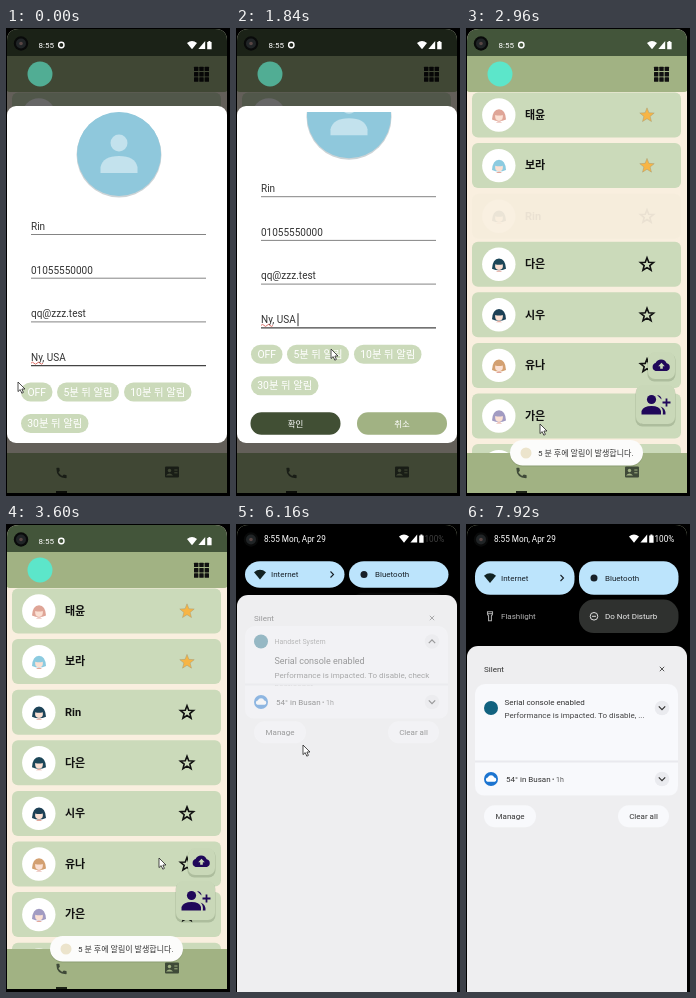
An HTML page that plays this animation: 224 px wide and 468 px high, repeating every 8000 ms.

```html
<!DOCTYPE html>
<html lang="ko">
<head>
<meta charset="utf-8">
<style>
html, body { margin: 0; width: 100%; height: 100%; overflow: hidden; background: #000; }
svg { display: block; width: 224px; height: 468px; }
text { font-family: Roboto, "Noto Sans CJK KR", "Noto Sans CJK", sans-serif; white-space: pre; }
</style>
</head>
<body>
<svg id="stage" viewBox="0 0 224 468"></svg>
<script>
const LOOP = 8000;
const INK = '#20085a', CARD = '#cbdaba', OLIVE = '#a1b283';

// Markup helpers
const rect = (x, y, w, h, fill, r = 0, extra = '') =>
  `<rect x="${x}" y="${y}" width="${w}" height="${h}" rx="${r}" fill="${fill}" ${extra}/>`;
const circle = (x, y, r, fill, extra = '') => `<circle cx="${x}" cy="${y}" r="${r}" fill="${fill}" ${extra}/>`;
const path = (d, fill, extra = '') => `<path d="${d}" fill="${fill}" ${extra}/>`;
const line = (d, color, width = 1) => path(d, 'none', `stroke="${color}" stroke-width="${width}"`);
const text = (x, y, size, fill, str, extra = '') =>
  `<text x="${x}" y="${y}" font-size="${size}" fill="${fill}" ${extra}>${str}</text>`;
const group = (id, body, extra = '') => `<g id="${id}" ${extra}>${body}</g>`;
const at = (x, y, body) => `<g transform="translate(${x} ${y})">${body}</g>`;
const scaled = (k, body) => `<g transform="scale(${k})">${body}</g>`;
const MID = 'text-anchor="middle"';

function star(x, y, filled) {
  const outer = filled ? 7.6 : 6.9;
  const pts = Array.from({ length: 10 }, (_, i) => {
    const r = i % 2 ? outer * .43 : outer, a = i * Math.PI / 5 - Math.PI / 2;
    return `${(x + r * Math.cos(a)).toFixed(2)} ${(y + .4 + r * Math.sin(a)).toFixed(2)}`;
  });
  const style = filled ? 'stroke="#a89a72" stroke-width=".5"' : 'stroke="#111" stroke-width="1.6"';
  return path(`M${pts.join('L')}Z`, filled ? '#f7b545' : 'none', style);
}

const face = hair =>
  path('M-7 4Q-6.5-6 0-6.3Q6.5-6 7 4Q0 7-7 4Z', hair) +
  path('M-3.8-.4Q0 .6 3.8-.4Q4.6 5 0 5.4Q-4.6 5-3.8-.4Z', '#fbe0d3') +
  path('M-3 7Q0 4.4 3 7Z', '#e3a79b');

const row = (name, hair, fav) =>
  rect(6, 0, 209, 45, CARD, 6) + circle(32.8, 22.5, 16.7, '#fff') + at(33, 23, face(hair)) +
  text(59, 26.3, 11, '#111', name, 'font-weight="700"') + star(181, 22.5, fav);

const rowTop = i => 64.5 + 50.6 * i;

const statusIcons = (x, y) => at(x, y,
  path('M-5-2Q0-6 5-2L0 4.2Z', '#fff') + path('M6.4 4H13.2V-4Z', '#fff') +
  path('M15.2-3H16.4V-4H18.4V-3H19.6V4.2H15.2Z', '#fff'));

const phoneIcon = scaled(.57, at(-12, -12, path('M3 4Q3 3 4 3H7.5Q8.5 3 8.5 4Q8.5 6 9.2 8L6.6 10.8' +
  'Q9 15.2 13.2 17.4L16 14.8Q18 15.5 20 15.5Q21 15.5 21 16.5V20Q21 21 20 21Q3 20.5 3 4Z', '#3f4a38')));
const cardIcon = rect(-7, -5.5, 14, 11, '#3f4a38', 1) + circle(-2.5, -1.5, 1.7, OLIVE) +
  path('M-6 3.5Q-2.5-.3 1 3.5Z', OLIVE) + line('M2.3-2H5.5M2.3 .8H5.5', OLIVE);

const fab = (x, y, size, body) =>
  rect(x - .5, y + 1, size + 1, size + 1.5, '#364528', 7, 'opacity=".2"') +
  rect(x, y, size, size, '#c9d8b8', 7) + at(x + size / 2, y + size / 2, body);
const cloudUp = scaled(1.08, path('M-5.5 5A3.8 3.8 0 0 1-5.5-2.3A5.6 5.6 0 0 1 4.8-2A3.6 3.6 0 0 1 5 5Z', INK) +
  path('M0-2.5L3 .6H1.2V3H-1.2V.6H-3Z', '#c9d8b8'));
const addPeople = circle(-4, -5, 4.6, INK) + path('M-14 10V6.5Q-12 1.5-4 1.5Q4 1.5 5.5 6.5V10Z', INK) +
  path('M1.5-9.5Q6-9 6-5Q6-1-.0 1.5-.6Q4-5 1.5-9.5Z'.replace('-.0 ', ''), INK) +
  path('M5 2Q10.5 4 10 10H7.3Q8 4.5 5 2Z', INK) +
  line('M11-6V2M7-2H15', INK, 1.8);

// Contact list screen
const people = [
  ['태윤', '#dfa597', true], ['보라', '#8ccbe0', true], ['다은', '#1c4658'], ['시우', '#1d4055'],
  ['유나', '#d3a071'], ['가은', '#a29bc2'], ['도현', '#dc9a3c']
];
const gridIcon = Array.from({ length: 9 }, (_, i) =>
  rect(188 + i % 3 * 5.3, 38.7 + Math.floor(i / 3) * 5.3, 4.4, 4.4, '#111', .5)).join('');

const home =
  rect(0, 0, 222, 465, '#f9efdf') +
  people.slice(0, 2).map((p, i) => at(0, rowTop(i), row(...p))).join('') +
  group('newRow', at(0, rowTop(2), row('Rin', '#1d4358'))) +
  group('lowerRows', people.slice(2).map((p, i) => at(0, rowTop(i + 2), row(...p))).join('')) +
  fab(182, 324, 27, cloudUp) + fab(170, 357, 39, addPeople) +
  rect(0, 24, 222, 40, OLIVE, 4) + rect(0, 0, 222, 28, '#43553a') + gridIcon +
  rect(0, 425, 222, 42, OLIVE) + at(55.5, 445, phoneIcon) + at(166, 444, cardIcon) +
  rect(50, 463, 11, 2, '#1d2417') + rect(0, 465, 222, 3, '#000');

const homeStatus = group('homeStatus',
  text(32.5, 20, 8, '#fff', '8:55') + circle(55.3, 17, 2.7, 'none', 'stroke="#fff" stroke-width="1.4"') +
  statusIcons(186, 17));
const logo = circle(34, 46, 12.5, '#5ce6ca', 'id="logo"');
const camera = circle(15, 15.5, 7.2, '#090a0a') + circle(15, 15.5, 5, '#202426') + circle(15, 15.5, 1.8, '#574543');

// Edit dialog
const chip = (x, y, w, label, id = '') =>
  rect(x, y, w, 19, CARD, 9.5, id && `id="${id}"`) + text(x + w / 2, y + 13.2, 10.4, '#fff', label, MID);
const button = (x, fill, label) =>
  rect(x, 422, 90, 22.5, fill, 11) + text(x + 45, 436.4, 8.5, '#fff', label, MID);
const field = (value, i) => {
  const y = 43.7 * i;
  return text(25, 201.8 + y, 10, '#333', value) +
    line(`M25 ${206.5 + y}H200`, i === 3 ? '#444' : '#777', i === 3 ? 1.2 : .9);
};
const dialog = group('dialog',
  rect(1, 78, 220, 337, '#fff', 9) +
  `<g clip-path="url(#dialogClip)">` + group('form',
    circle(113, 127, 42.5, '#ccd3d6') + circle(113, 126, 42, '#8fc8dc') +
    circle(113, 115, 8.5, '#c3e2ed') + path('M94.5 145V139Q97 128 113 128Q129 128 131.5 139V145Z', '#c3e2ed') +
    ['Rin', '01055550000', 'qq@zzz.test', 'Ny, USA'].map(field).join('') +
    line('M25 335.2q1.5-2 3 0t3 0t3 0t3 0', '#d9534a', .8) +
    rect(61.5, 323, 1, 13, '#333', 0, 'id="caret"') +
    chip(15, 354.5, 31.5, 'OFF') + chip(51, 354.5, 62, '5분 뒤 알림', 'choice') +
    chip(118, 354.5, 67.5, '10분 뒤 알림') + chip(15, 386, 67.5, '30분 뒤 알림') +
    button(14.5, '#414f34', '확인') + button(121, OLIVE, '취소')) + '</g>');

const toast = group('toast',
  rect(44, 413.5, 133, 25, '#3a4630', 12.5, 'opacity=".2"') + rect(44, 412, 133, 25.5, '#fcfcfb', 12.7) +
  circle(60, 425, 5.5, '#ece4cc') +
  group('toastText', text(72, 428, 8, '#333', '5 분 후에 알림이 발생합니다.')));

// Notification shade
const tile = (x, fill, ink, label, icon) =>
  rect(x, -16.8, 99.5, 33.6, fill, 15, 'class="tileBox"') + at(x + 15, 0, icon) + text(x + 26, 2.9, 8, ink, label);
const wifi = path('M-6-2.3Q0-7 6-2.3L0 5Z', '#122');
const torch = path('M-2.5-4.5H2.5V-2L1.4-.5V4.5H-1.4V-.5L-2.5-2Z', 'none', 'stroke="#aaa" stroke-width="1.1"') +
  line('M-2.5-2.6H2.5', '#aaa');
const mute = circle(0, 0, 3.8, 'none', 'stroke="#ddd" stroke-width="1"') + line('M-2 0H2', '#ddd');
const chevron = (y, up) => circle(196, y, 7.3, '#eaebef') +
  line(up ? `M192.8 ${y + 1.6}l3.2-3.2l3.2 3.2` : `M192.8 ${y - 1.6}l3.2 3.2l3.2-3.2`, '#333', 1.2);
const pill = (x, w, label) => rect(x, -11, w, 22, '#f8f9fc', 11) + text(x + w / 2, 2.8, 8, '#333', label, MID);

const shade = group('shade',
  rect(0, 0, 224, 468, '#000', 0, 'id="scrim"') +
  group('shadeStatus', text(28, 17.5, 8.2, '#fff', '8:55 Mon, Apr 29') + statusIcons(168, 14.5) +
    group('percent', text(188.5, 17.5, 8.2, '#fff', '100%'))) +
  group('tiles',
    group('tilesTop', tile(9, '#bce4fc', '#182028', 'Internet', wifi) + line('M94.5-3l3 3l-3 3', '#182028', 1.1) +
      tile(113, '#bce4fc', '#182028', 'Bluetooth', circle(0, 0, 3.5, '#182028'))) +
    group('tilesLow', tile(9, '#000', '#b2b2b2', 'Flashlight', torch) +
      tile(113, '#2f312f', '#ededed', 'Do Not Disturb', mute))) +
  group('panel',
    rect(1, 0, 220, 480, '#eeeef0', 11) +
    group('notes',
      text(18, 25.5, 8, '#333', 'Silent') + line('M193.8 20.8l4.4 4.4m0-4.4l-4.4 4.4', '#444', .9) +
      `<g clip-path="url(#noteClip)">` + group('card',
        rect(9, 0, 203, 130, '#f8f9fc', 10) +
        group('opened', circle(25, 15.5, 7, '#2c778f') + text(38.5, 18, 7, '#777', 'Handset System') +
          chevron(15.5, true) + text(38.5, 37.5, 9, '#333', 'Serial console enabled') +
          text(38.5, 52, 8, '#555', 'Performance is impacted. To disable, check') +
          text(38.5, 63, 8, '#555', 'bootloader')) +
        group('closed', circle(25, 24, 7, '#11627f') + chevron(24, false) +
          text(38.5, 20.5, 8, '#333', 'Serial console enabled') +
          text(38.5, 33.5, 8, '#444', 'Performance is impacted. To disable, ...'))) + '</g>' +
      group('weather', path('M9-16.5H212V6.5Q212 16.5 202 16.5H19Q9 16.5 9 6.5Z', '#f8f9fc') +
        line('M9-17.5H212', '#e9e9ee', 2) + circle(25, 0, 7, '#1b74d0') +
        path('M21.5 2.8a2.2 2.2 0 0 1 .3-4.3a3.5 3.5 0 0 1 6.5 0a2.2 2.2 0 0 1 .4 4.3Z', '#fff') +
        text(40, 3, 8, '#333', '54° in Busan') + text(86, 3, 7, '#555', '• 1h') + chevron(0, false)) +
      group('actions', pill(18, 52, 'Manage') + pill(152, 51, 'Clear all')))));

const cursor = group('cursor',
  path('M0 0V9.6L2.2 7.6L3.8 11.2L5.4 10.4L3.9 7H7Z', '#fff', 'stroke="#222" stroke-width=".8"'));

const stage = document.getElementById('stage');
stage.innerHTML = `<defs>
  <clipPath id="screenClip"><path d="M1 480V13Q1 1 13 1H209Q221 1 221 13V480Z"/></clipPath>
  <clipPath id="dialogClip"><rect x="1" y="84" width="220" height="325"/></clipPath>
  <clipPath id="noteClip"><rect id="noteMask" x="9" width="203"/></clipPath></defs>` +
  rect(0, 0, 224, 468, '#000') + '<g clip-path="url(#screenClip)">' + home +
  rect(0, 0, 222, 465, '#000', 0, 'id="dim"') + logo + homeStatus + dialog + toast + shade + camera + '</g>' + cursor;

const el = {};
stage.querySelectorAll('[id]').forEach(node => { el[node.id] = node; });
const tileBoxes = stage.querySelectorAll('.tileBox');

// Keyframes as [time, value], eased between neighbours
function key(t, ...frames) {
  if (t <= frames[0][0]) return frames[0][1];
  for (let i = 1; i < frames.length; i++) {
    const [t0, a] = frames[i - 1], [t1, b] = frames[i];
    if (t < t1) {
      const u = (t - t0) / (t1 - t0);
      return a + (b - a) * u * u * (3 - 2 * u);
    }
  }
  return frames[frames.length - 1][1];
}
const mix = (a, b, u) => a + (b - a) * u;
const move = (id, x, y) => el[id].setAttribute('transform', `translate(${x} ${y})`);
const fade = (id, a) => {
  el[id].setAttribute('opacity', a);
  el[id].style.display = a > 0 ? '' : 'none';
};

const pointer = [
  [0, 12, 354], [460, 62, 366], [1180, 92, 327], [1680, 95, 321], [2080, 95, 321], [2520, 66, 393],
  [2720, 70, 397], [2960, 74, 396], [3600, 153, 334], [4320, 212, 363], [4840, 212, 363],
  [5360, 73, 11], [5700, 73, 11], [6160, 67, 221], [6600, 60, 365], [6760, 56, 370], [7240, -12, 350]
];

function drawShade(t) {
  const top = key(t, [5680, 24], [6160, 71], [7240, 122]);
  const open = Math.max(0, (top - 71) / 51);
  const closed = t >= 7920;
  fade('shade', t >= 5720 ? 1 : 0);
  fade('scrim', key(t, [5700, 0], [6040, 1]));
  fade('homeStatus', key(t, [5700, 1], [5960, 0]));
  fade('shadeStatus', key(t, [5760, 0], [6080, 1]));
  fade('percent', key(t, [6080, .2], [6640, 1]));
  fade('tiles', key(t, [5760, 0], [6100, 1]));
  fade('tilesLow', key(t, [6100, .2], [6800, 1]));
  move('tilesTop', 0, mix(50.5, 54, open));
  move('tilesLow', 0, mix(82, 92.3, open));
  const half = mix(13.2, 16.8, open);
  tileBoxes.forEach(box => {
    box.setAttribute('y', -half);
    box.setAttribute('height', half * 2);
  });

  fade('panel', key(t, [5740, 0], [6040, 1]));
  move('panel', 0, top);
  fade('notes', key(t, [5960, 0], [6160, .45], [6640, 1]));
  const cardTop = mix(31, 38, open);
  const weatherY = closed ? 133 : mix(107, 135, open);
  move('card', 0, cardTop);
  el.noteMask.setAttribute('y', cardTop);
  el.noteMask.setAttribute('height', weatherY - 16 - cardTop);
  fade('opened', closed ? 0 : 1);
  fade('closed', closed ? 1 : 0);
  move('weather', 0, weatherY);
  move('actions', 0, closed ? 170.3 : mix(137.3, 172.3, open));
}

function draw(t) {
  move('form', 0, key(t, [460, 0], [1180, -37.8]));
  el.caret.style.display = Math.floor(t / 500) % 2 ? '' : 'none';
  el.choice.setAttribute('fill', t < 2000 ? CARD : '#a8ba90');
  fade('dialog', key(t, [2560, 1], [2720, .2], [2840, 0]));
  const dim = key(t, [2600, .6], [2720, .34], [2960, 0]);
  fade('dim', dim);
  fade('logo', 1 - dim * .6);

  move('lowerRows', 0, key(t, [2680, 0], [2720, 1.5], [3000, 50.6]));
  fade('newRow', key(t, [2920, 0], [3200, 1]));

  const grow = key(t, [2640, .93], [2720, .965], [2880, 1]);
  fade('toast', key(t, [2640, 0], [2720, .95], [2840, 1]));
  fade('toastText', key(t, [2680, 0], [2720, .15], [2960, 1]));
  el.toast.setAttribute('transform', `translate(110.5 425) scale(${grow}) translate(-110.5 -425)`);

  drawShade(t);
  move('cursor', key(t, ...pointer.map(p => [p[0], p[1]])), key(t, ...pointer.map(p => [p[0], p[2]])));
}

const start = performance.now();
function tick() {
  draw((performance.now() - start) % LOOP);
  requestAnimationFrame(tick);
}
tick();
</script>
</body>
</html>
```
